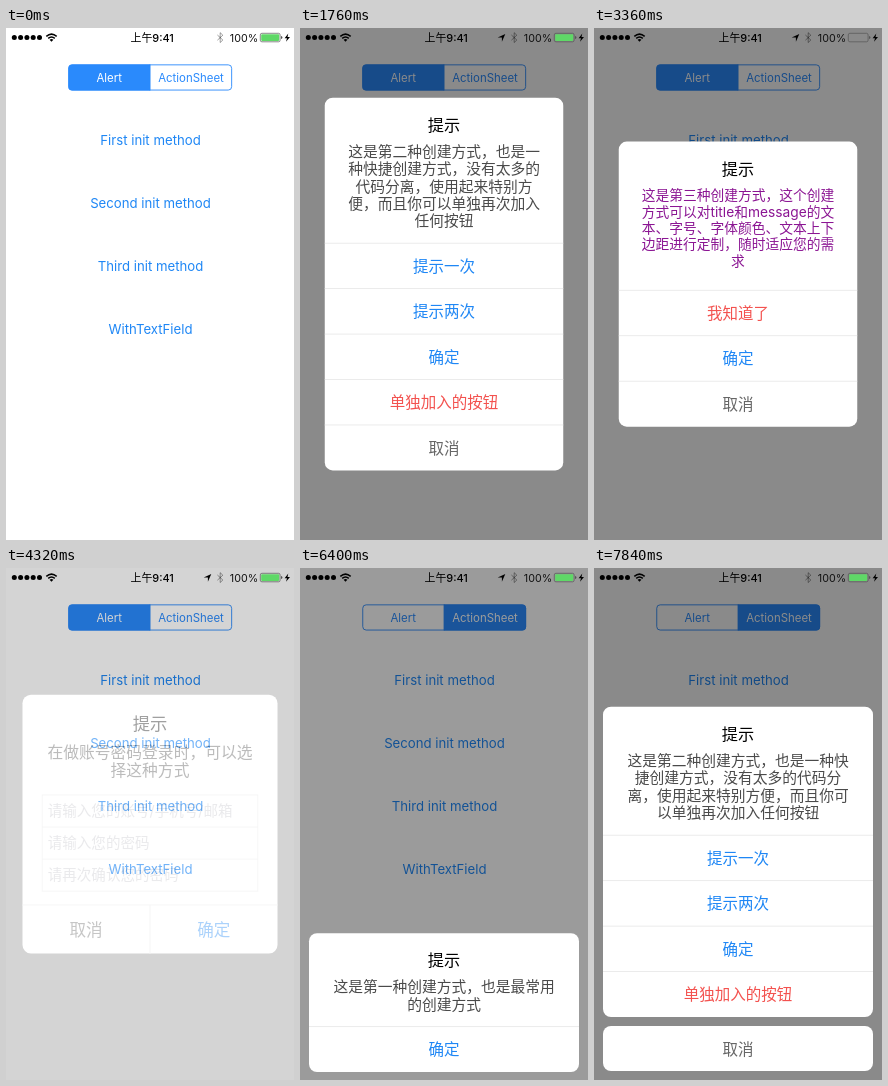
An HTML page for the animation above (7920 ms loop, 288 by 512 pixels).

```html
<!DOCTYPE html>
<html lang="zh-CN">
<head>
<meta charset="utf-8">
<title>Alert and ActionSheet</title>
<style>
html, body { margin: 0; width: 100%; height: 100%; overflow: hidden; background: #fff; }
svg { display: block; width: 100vw; height: 100vh; }
text { font-family: Inter, "Noto Sans CJK SC", "Noto Sans CJK", sans-serif; text-anchor: middle; }
</style>
</head>
<body>
<svg id="stage" viewBox="0 0 288 512"></svg>
<script>
const LOOP = 7920, STEP = 80, ROW = 45.45;
const BLUE = '#1f87f5', SEG = '#2a8afc', RED = '#f3524f', GRAY = '#666', RULE = '#e6e6e6';
const LEFT = 24.75, WIDTH = 238.5;

const text = (s, x, y, size, fill, more = '') =>
  `<text x="${x}" y="${y + size * 0.365}" font-size="${size}" fill="${fill}" ${more}>${s}</text>`;
const rect = (x, y, w, h, fill, more = '') =>
  `<rect x="${x}" y="${y}" width="${w}" height="${h}" fill="${fill}" ${more}/>`;
const card = (x, y, w, h) => rect(x, y, w, h, '#fff', 'rx="8"');
const hline = (x, y, w) => rect(x, y - 0.4, w, 0.8, RULE);

// Title and message, measured from the top of the card
function header(y, lines, { size = 14.75, pitch = 17.3, fill = '#4a4a4a' } = {}) {
  return text('提示', 144, y + 27.3, 16.2, '#000') +
    lines.map((s, i) => text(s, 144, y + 53.8 + i * pitch, size, fill)).join('');
}

// Stacked action rows under a separator each
const rows = (x, y, w, actions) => actions.map(([s, c], i) =>
  hline(x, y + i * ROW, w) + text(s, 144, y + (i + 0.5) * ROW + 0.2, 15.5, c)).join('');

// Two actions side by side
const pair = y => hline(LEFT, y, WIDTH) + rect(143.6, y, 0.8, ROW, RULE) +
  text('取消', 84.2, y + ROW / 2 + 0.6, 15.5, GRAY) + text('确定', 203.7, y + ROW / 2 + 0.6, 15.5, BLUE);

const dim = rect(0, 0, 288, 512, '#000', 'class="dim" opacity=".46"');

function alertBox(id, headH, footH, head, foot) {
  const h = headH + footH, y = 256.1 - h / 2;
  return `<g id="${id}">${dim}<g class="card">${card(LEFT, y, WIDTH, h)}${head(y)}${foot(y + headH)}</g></g>`;
}

function sheet(id, lines, actions) {
  const y = 449 - actions.length * ROW, top = y - 76 - (lines.length - 1) * 17.5;
  return `<g id="${id}">${dim}<g class="card">${card(9, top, 270, 449 - top)}` +
    header(top, lines, { pitch: 17.5 }) + rows(9, y, 270, actions) +
    card(9, 458, 270, 45) + text('取消', 144, 481, 15.5, GRAY) + '</g></g>';
}

function fields(y) {
  const hints = ['请输入您的账号/手机号/邮箱', '请输入您的密码', '请再次确认您的密码'];
  return rect(43.2, y, 201.6, 90, 'none', `stroke="${RULE}" stroke-width=".8"`) +
    hints.map((s, i) => (i ? hline(43.2, y + i * 30, 201.6) : '') +
      text(s, 48.4, y + 14.5 + i * 30, 13.6, '#c7c7cd', 'style="text-anchor:start"')).join('');
}

const page = rect(0, 0, 288, 512, '#fff') +
  '<clipPath id="round"><rect x="62.3" y="36.4" width="163.8" height="26.1" rx="3.8"/></clipPath>' +
  '<g clip-path="url(#round)">' +
  rect(62, 36, 82, 27, SEG, 'id="fillL"') + rect(144, 36, 83, 27, SEG, 'id="fillR"') + '</g>' +
  rect(62.75, 36.85, 162.9, 25.2, 'none', `rx="3.4" stroke="${SEG}" stroke-width=".9"`) +
  rect(143.6, 36.4, 0.9, 26.1, SEG) +
  text('Alert', 103.2, 49.4, 11.45, SEG, 'id="segL"') +
  text('ActionSheet', 185, 49.4, 11.45, SEG, 'id="segR"') +
  ['First init method', 'Second init method', 'Third init method', 'WithTextField']
    .map((s, i) => text(s, 144.5, 111.8 + 63 * i, 13.2, BLUE)).join('');

const statusBar = [0, 1, 2, 3, 4].map(i => `<circle cx="${8.3 + 6.3 * i}" cy="9.6" r="2.5"/>`).join('') +
  '<g fill="none" stroke="#000" stroke-width="1.5">' +
  '<path d="M40.3 8.4Q45.5 3.8 50.7 8.4M42.2 10.4Q45.5 7.5 48.8 10.4"/></g>' +
  '<path d="M43.6 11.7Q45.5 10.2 47.4 11.7L45.5 13.7Z"/>' +
  text('上午9:41', 146.2, 9.6, 10.9, '#000', 'font-weight="500"') +
  '<path id="arrow" d="M205.3 6L201.9 13.8V9.6H197.7Z"/>' +
  '<path d="M211.4 7L216.8 12L214.2 14.5V4.7L216.8 7.2L211.4 12.2" fill="none" stroke="#000" stroke-opacity=".42" stroke-width=".9"/>' +
  text('100%', 238, 9.6, 10.7, '#111') +
  rect(254.3, 5.3, 19.8, 8.5, 'none', 'rx="1.6" stroke="#555" stroke-width=".7"') +
  rect(255.2, 6.2, 18, 6.7, '#5fd867', 'id="charge" rx=".8"') +
  '<path d="M275 8v3.1q1.4-.4 1.4-1.55T275 8Z" fill="#555"/>' +
  '<path d="M282.3 5.6L278.6 10.2H281L280 13.8L284 8.9H281.5Z"/>';

const extra = [['提示一次', BLUE], ['提示两次', BLUE], ['确定', BLUE], ['单独加入的按钮', RED]];

document.getElementById('stage').innerHTML = page +
  alertBox('a1', 94, ROW, y => header(y, ['这是第一种创建方式，也是最', '常用的创建方式']), pair) +
  alertBox('a2', 145.4, 5 * ROW, y => header(y, ['这是第二种创建方式，也是一', '种快捷创建方式，没有太多的',
    '代码分离，使用起来特别方', '便，而且你可以单独再次加入', '任何按钮']),
    y => rows(LEFT, y, WIDTH, [...extra, ['取消', GRAY]])) +
  alertBox('a3', 148.7, 3 * ROW, y => header(y, ['这是第三种创建方式，这个创建', '方式可以对title和message的文',
    '本、字号、字体颜色、文本上下', '边距进行定制，随时适应您的需', '求'],
    { size: 13.75, pitch: 16.3, fill: '#8b1593' }),
    y => rows(LEFT, y, WIDTH, [['我知道了', RED], ['确定', BLUE], ['取消', GRAY]])) +
  alertBox('a4', 196.7, ROW, y => header(y, ['在做账号密码登录时，可以选', '择这种方式']) + fields(y + 93.8), pair) +
  sheet('s1', ['这是第一种创建方式，也是最常用', '的创建方式'], [['确定', BLUE]]) +
  sheet('s2', ['这是第二种创建方式，也是一种快', '捷创建方式，没有太多的代码分', '离，使用起来特别方便，而且你可', '以单独再次加入任何按钮'], extra) +
  `<g>${statusBar}</g>`;

const $ = id => document.getElementById(id);
const clamp = v => Math.min(1, Math.max(0, v));
const smooth = v => v * v * (3 - 2 * v);
const quartOut = v => 1 - (1 - v) ** 4;
const ramp = (t, start, dur, ease) => ease(clamp((t - start) / dur));

// Start times of showing and hiding
const alerts = { a1: [394, 1032], a2: [1492, 2292], a3: [2852, 3592], a4: [4217, 4952] };
const sheets = { s1: [6210, 6872], s2: [7330, LOOP] };

function show(g, on) { g.style.display = on ? '' : 'none'; }

function segment(side, on) {
  $('fill' + side).setAttribute('opacity', on);
  const mix = (a, b) => Math.round(a + (b - a) * on);
  $('seg' + side).setAttribute('fill', `rgb(${mix(42, 255)},${mix(138, 255)},${mix(252, 255)})`);
}

function render(t) {
  for (const id in alerts) {
    const [start, end] = alerts[id], g = $(id);
    const p = ramp(t, start, 250, smooth), a = p * (1 - ramp(t, end, 250, smooth));
    const k = 1 + 0.11 * (1 - p);
    show(g, a > 0.004);
    g.setAttribute('opacity', a);
    g.querySelector('.card').setAttribute('transform', `translate(144 256) scale(${k}) translate(-144 -256)`);
    if (id === 'a3') show($('charge'), a < 0.5);
  }
  for (const id in sheets) {
    const [start, end] = sheets[id], g = $(id);
    const p = ramp(t, start, 500, quartOut) * (1 - ramp(t, end, 245, smooth));
    show(g, p > 0.004);
    g.querySelector('.dim').setAttribute('opacity', 0.46 * p);
    g.querySelector('.card').setAttribute('transform', `translate(0 ${(1 - p) * 373})`);
  }
  const right = ramp(t, 5460, 220, smooth);
  segment('L', 1 - right);
  segment('R', right);
  show($('arrow'), t >= 1520 && t < 6480);
}

const origin = performance.now();
function tick() {
  const t = (performance.now() - origin) % LOOP;
  render(Math.floor(t / STEP) * STEP);
  requestAnimationFrame(tick);
}
render(0);
requestAnimationFrame(tick);
</script>
</body>
</html>
```
